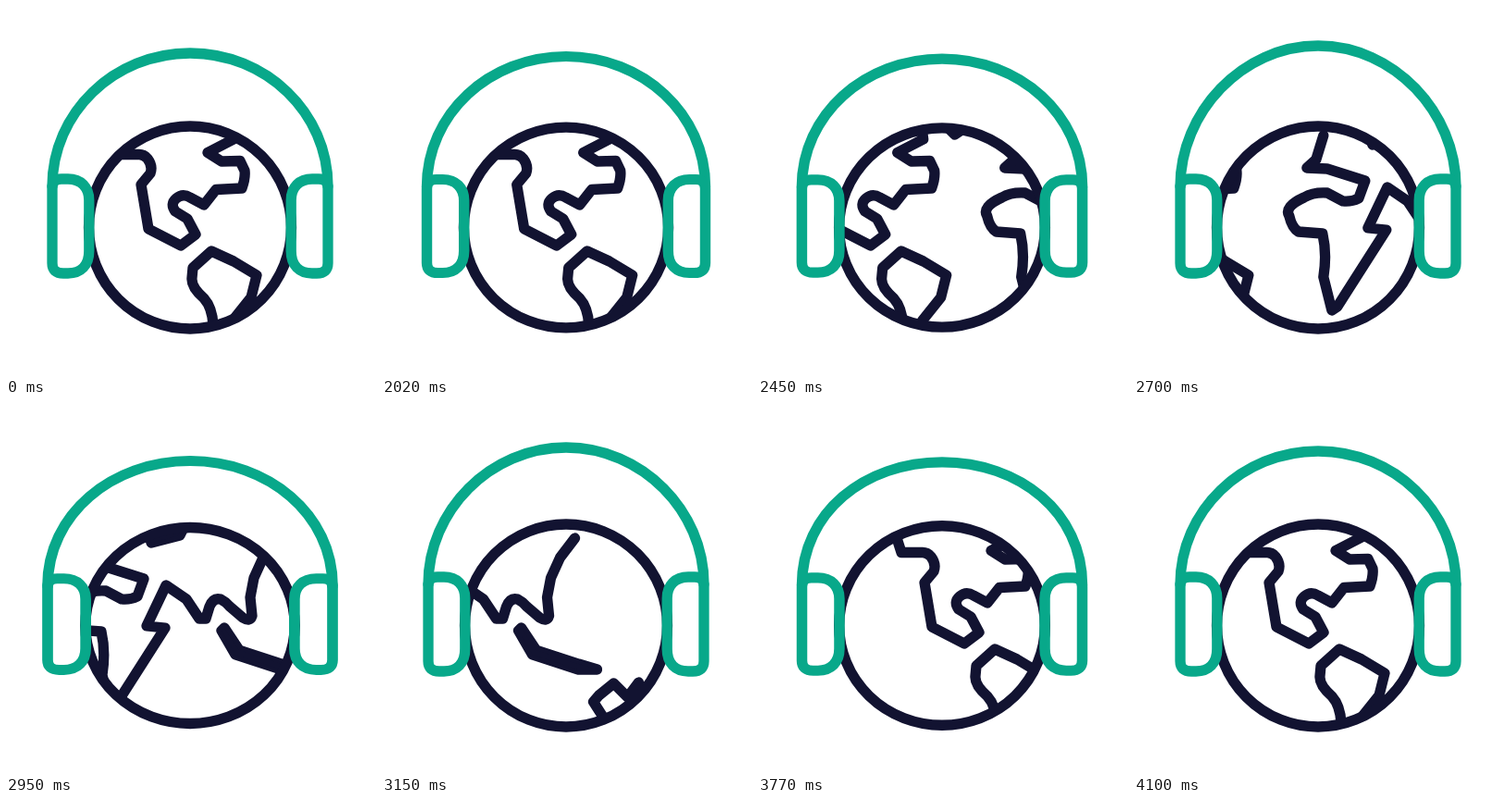
Recreate the animation shown at these times as an HTML page with a canvas. Size 400 px wide and 400 px high, loop 4120 ms.

```html
<!DOCTYPE html>
<html lang="en">
<head>
<meta charset="utf-8">
<title>Globe with headphones</title>
<style>
  html, body { margin: 0; width: 100%; height: 100%; overflow: hidden; background: #fff; }
  canvas { display: block; width: 100vw; height: 100vh; }
</style>
</head>
<body>
<canvas id="stage" width="400" height="400"></canvas>
<script>
const ctx = document.getElementById('stage').getContext('2d');
const NAVY = '#121331', GREEN = '#08a88a';
const CX = 199, CY = 239.5, R = 109.5, LINE = 11.3;
const LOOP = 4120, HOLD = 2020, STEP = 25, BEAT = 400, BEATS = 5;
const MAP_WIDTH = 577;

// [time, value] keys
const SCROLL = [[0, 0], [25, 0.3], [450, 67.3], [950, 248], [1425, 446], [1775, 543], [2100, MAP_WIDTH]];
const SQUASH = [[0, 0], [25, 1.5], [50, 2.6], [100, 8], [150, 5], [175, 2.5], [225, 0], [400, 0]];
const BAND = [[0, 0], [25, 1.7], [50, 3], [100, 4], [150, 4.7], [175, 9], [225, 0], [300, -8], [400, 0]];

// Flat world map that slides behind the round window
const lands = [
  // North America
  'M114 130L117 148L121 160.5H144Q149 160.5 153 165Q159 173 156 181L146 193L154 241L189 259' +
  'L205 247L196 230L183 222Q177 214 184 208Q191 202 199 207L214 215L227 198.5L255 197' +
  'Q259 186 258 178L253 167.5L233 168L218 158.5L246 144L244 128',
  // South America
  'M222 265L246 276L271 291L265 315L245 340L236 358H227L224 345Q223 326 214 316' +
  'Q200 304 201 294L202 283Z',
  // Greenland
  'M266 120L275 134L280 139L286 135L296 120Z',
  // Africa, Europe and Asia
  'M352 140L344 166L334 175L356 176L397 189L390 208Q382 212 373 211L356 202Q341 201 331 207' +
  'Q309 217 315 227Q318 240 325 244L351 246Q356 268 352 293L361 329L367 325L374 314L420 242' +
  'L400 240L421 196L443 211L457 232H464L468 219Q472 209 480 211Q486 214 490 219L504 231' +
  'Q512 236 514 229L512 209L516 188L526 166L542 145'
].map(d => new Path2D(d));

const solids = [
  'M400 128L405 150L436 142L444 126Z',
  'M484 242L500 266L546 281L566 287L545 287L496 271L481 245Z'
].map(d => new Path2D(d));

const australia = new Path2D('M562 322L568 315L584 302L599 317L611 301L613 320L624 339L620 360L580 350Z');
lands.push(australia, ...solids);

const cup = new Path2D(
  'M50 197Q50 187 60 187H67C81 187 89.8 196 89.8 210V265C89.8 280 81 289 67 289H62Q50 289 50 278Z');

// Monotone cubic interpolation between keys
function curve(keys, t) {
  const last = keys.length - 1;
  if (t <= keys[0][0]) return keys[0][1];
  if (t >= keys[last][0]) return keys[last][1];
  const slope = i => (keys[i + 1][1] - keys[i][1]) / (keys[i + 1][0] - keys[i][0]);
  const tangent = i => {
    if (i === 0 || i === last) return 0;
    const a = slope(i - 1), b = slope(i);
    return a * b <= 0 ? 0 : 2 * a * b / (a + b);
  };
  let i = 0;
  while (keys[i + 1][0] < t) i++;
  const h = keys[i + 1][0] - keys[i][0];
  const u = (t - keys[i][0]) / h, v = 1 - u;
  return keys[i][1] * v * v * (1 + 2 * u) + keys[i + 1][1] * u * u * (3 - 2 * u) +
    h * u * v * (tangent(i) * v - tangent(i + 1) * u);
}

// The outline squashes, the map inside keeps its shape
function drawGlobe(shift, sx, sy) {
  const disc = new Path2D();
  disc.ellipse(CX, CY, R * sx, R * sy, 0, 0, Math.PI * 2);
  ctx.strokeStyle = ctx.fillStyle = NAVY;
  ctx.save();
  ctx.clip(disc);
  ctx.translate(-shift, 0);
  for (let copy = 0; copy < 2; copy++) {
    lands.forEach(p => ctx.stroke(p));
    solids.forEach(p => ctx.fill(p));
    ctx.translate(MAP_WIDTH, 0);
  }
  ctx.restore();
  ctx.stroke(disc);
}

function drawHeadphones(drop, sx, sy) {
  const base = 195, top = 51 + drop, side = base - 79.5, reach = 82.3;
  ctx.save();
  ctx.translate(CX, CY);
  ctx.scale(sx, sy);
  ctx.translate(-CX, -CY);
  ctx.strokeStyle = GREEN;
  ctx.beginPath();
  ctx.moveTo(50, base);
  ctx.bezierCurveTo(50, side, CX - reach, top, CX, top);
  ctx.bezierCurveTo(CX + reach, top, 348, side, 348, base);
  ctx.stroke();
  ctx.stroke(cup);
  ctx.translate(2 * CX, 0);
  ctx.scale(-1, 1);
  ctx.stroke(cup);
  ctx.restore();
}

function draw(time) {
  const t = time % LOOP;
  const run = t < HOLD ? 0 : (Math.floor((t - HOLD) / STEP) + 1) * STEP;
  const phase = run < BEAT * BEATS ? run % BEAT : 0;
  const out = curve(SQUASH, phase);
  const sx = 1 + out / 149, sy = 1 - out * 0.0064;

  ctx.fillStyle = '#fff';
  ctx.fillRect(0, 0, 400, 400);
  ctx.lineWidth = LINE;
  ctx.lineCap = ctx.lineJoin = 'round';
  drawGlobe(curve(SCROLL, run), sx, sy);
  drawHeadphones(curve(BAND, phase), sx, sy);
}

const start = performance.now();
function tick() {
  draw(performance.now() - start);
  requestAnimationFrame(tick);
}
tick();
</script>
</body>
</html>
```
